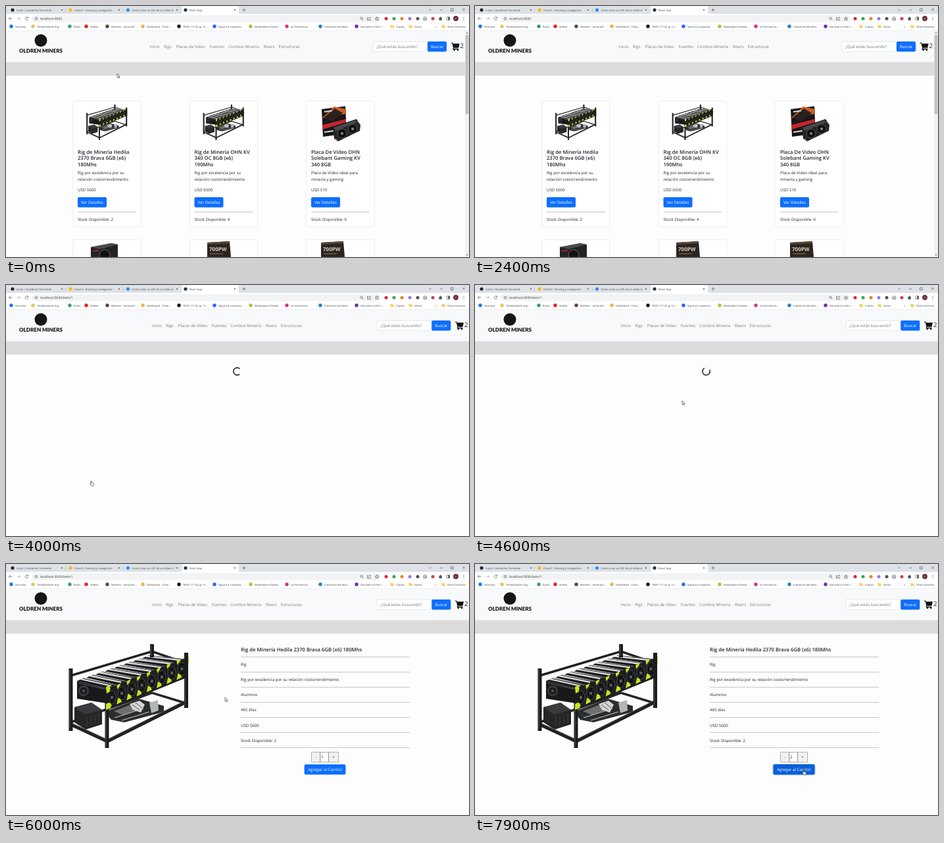
These frames come from a looping animation (704 by 382 pixels, 8 s). An HTML page:

```html
<!DOCTYPE html>
<html lang="es">
<head>
<meta charset="utf-8">
<title>React App</title>
<style>
  html, body { margin: 0; width: 100%; height: 100%; overflow: hidden; background: #fdfdfd; }
  svg { display: block; width: 100vw; height: 100vh; }
  text {
    font: 6.12px "Open Sans", "Noto Sans", sans-serif; fill: #212529;
    white-space: pre; text-rendering: geometricPrecision;
  }
  .tab { font-size: 4.1px; fill: #45494d; }
  .url { font-size: 4.9px; fill: #303336; }
  .mark { font-size: 3.95px; fill: #3c4043; }
  .nav { fill: #7a7b7c; }
  .hint { fill: #6c757d; }
  .title { font-size: 7.66px; font-weight: 600; }
  .brand { font: 900 8.1px Lato, "Open Sans", sans-serif; fill: #161616; }
  .count { font-size: 9.6px; }
  .light { fill: #fff; }
  .mid { text-anchor: middle; }
  .line { fill: none; stroke: #50545a; stroke-width: .7; }

  .step { animation: 8s step-end infinite; }
  .home { animation-name: home; }
  .loading { animation-name: loading; }
  .detail { animation-name: detail; }
  .item { animation-name: item; }
  .navShift { animation-name: navShift; }
  .endShift { animation-name: endShift; }
  .seeMore { animation-name: seeMore; }
  .plus { animation-name: plus; }
  .add { animation-name: add; }
  .ring { animation-name: ring; }
  .one { animation-name: one; }
  .two { animation-name: two; }
  .arrow { animation-name: arrow; }
  .hand { animation-name: hand; }
  .spin { transform-origin: 351.5px 131.5px; animation: spin 8s linear infinite; }
  .cursor { animation: travel 8s ease-in-out infinite; }

  @keyframes home { 0% { visibility: visible } 50%, 100% { visibility: hidden } }
  @keyframes loading { 0% { visibility: hidden } 50% { visibility: visible } 72.5%, 100% { visibility: hidden } }
  @keyframes detail { 0% { visibility: hidden } 72.5%, 100% { visibility: visible } }
  @keyframes item { 0% { visibility: hidden } 50%, 100% { visibility: visible } }
  @keyframes navShift { 0% { transform: none } 50%, 100% { transform: translateX(3.2px) } }
  @keyframes endShift { 0% { transform: none } 50%, 100% { transform: translateX(6.3px) } }
  @keyframes seeMore { 0% { fill: #0d6efd } 47.5% { fill: #0b5ed7 } 50%, 100% { fill: #0d6efd } }
  @keyframes plus { 0% { fill: #f2f2f2 } 87.5% { fill: #e4e4e4 } 93.75%, 100% { fill: #f2f2f2 } }
  @keyframes add { 0% { fill: #0d6efd } 82.5% { fill: #0b5ed7 } 86.25% { fill: #0d6efd } 93.75%, 100% { fill: #0b5ed7 } }
  @keyframes ring { 0% { opacity: 0 } 98.75%, 100% { opacity: 1 } }
  @keyframes one { 0% { opacity: 1 } 88.75%, 100% { opacity: 0 } }
  @keyframes two { 0% { opacity: 0 } 88.75%, 100% { opacity: 1 } }
  @keyframes arrow {
    0% { opacity: 1 } 11.25% { opacity: 0 } 36.25% { opacity: 1 } 41.25% { opacity: 0 }
    51.25% { opacity: 1 } 82.5%, 100% { opacity: 0 }
  }
  @keyframes hand {
    0% { opacity: 0 } 11.25% { opacity: 1 } 25% { opacity: 0 } 41.25% { opacity: 1 }
    51.25% { opacity: 0 } 82.5%, 100% { opacity: 1 }
  }
  @keyframes spin { 0%, 50% { transform: rotate(0) } 72.5%, 100% { transform: rotate(864deg) } }
  @keyframes travel {
    0% { transform: translate(169px, 103px) }
    11.25% { transform: translate(148px, 298px) }
    15% { transform: translate(151px, 311px) }
    18.75%, 36.25% { transform: translate(153.5px, 306.5px) }
    43.75%, 50% { transform: translate(129.5px, 298px) }
    57.5%, 60% { transform: translate(315px, 176px) }
    70%, 77.5% { transform: translate(333px, 203px) }
    83.75% { transform: translate(494px, 309px) }
    87.5%, 91.25% { transform: translate(497.5px, 295px) }
    95%, 100% { transform: translate(499.5px, 313px) }
  }
</style>
</head>
<body>
<script>
const text = (x, y, s, cls = '') => `<text x="${x}" y="${y}" class="${cls}">${s}</text>`;
const rect = (x, y, w, h, fill, r = 0, more = '') =>
  `<rect x="${x}" y="${y}" width="${w}" height="${h}" rx="${r}" fill="${fill}" ${more}/>`;
const dot = (x, y, r, fill, more = '') => `<circle cx="${x}" cy="${y}" r="${r}" fill="${fill}" ${more}/>`;
const poly = (points, fill, more = '') => `<polygon points="${points}" fill="${fill}" ${more}/>`;
const path = (d, more = 'class="line"') => `<path d="${d}" ${more}/>`;
const bar = (d, width, color) => path(d, `fill="none" stroke="${color}" stroke-width="${width}"`);
const rule = (x, y, w) => rect(x, Math.round(y), w, 1, '#c6c7c8');
const group = (cls, ...parts) => `<g class="${cls}">${parts.join('')}</g>`;
const repeat = (n, fn) => Array.from({ length: n }, (_, i) => fn(i)).join('');
const cross = (x, y, r) => path(`M${x - r} ${y - r}l${2 * r} ${2 * r}m0 ${-2 * r}l${-2 * r} ${2 * r}`);
const BLUE = '#0d6efd';
const LIME = '#cbe41c';

function browser() {
  const tabs = [
    [10, '#24272b', 'Inicio | Academia Torivende'],
    [98, '#f5ba15', 'Clase 8 - Routing y navegación'],
    [185.5, '#2d8cf0', 'Como crear un GIF de un vídeo d'],
    [273, '#20353b', 'React App'],
  ];
  const marks = [
    [8, '#1877f2', 'Vecinova'], [41, '#e5c65a', 'TiendaSolares Arg...'], [97, '#34a066', 'Rutas'],
    [122, '#e8211d', 'Videlia'], [154, '#5b4632', 'Workers - tamuro41...'],
    [208, '#e3b64c', 'Dashboard - Olvar...'], [263, '#111', 'TRVN 117.32 ▲ +3...'],
    [317, '#2962ff', 'Sigue tus criptomo...'], [372, '#a2c83a', 'Marketplace Dashb...'],
    [427, '#d63384', 'xx Ferrutecno...'], [478, '#2580c3', 'Cotización del dóla...'],
    [533, '#6f2da8', 'Gonzalo Le Virel /...'],
  ];
  const folders = [[587, 'Criptos'], [615, 'Varios'], [665, 'Otros favoritos']];
  const extensions = [
    [578, '#d8273b'], [590, '#35a853'], [602, '#e5822d'], [614, '#9a78d8'],
    [626, '#555'], [649, '#c8444b'],
  ];
  return [
    rect(0, 0, 704, 12.5, '#dee1e6'),
    rect(267.5, 0, 86.5, 13, '#fff', 2),
    rect(0, 12, 704, 26, '#fff'),
    ...tabs.map(([x, c, s], i) =>
      dot(x, 6, 2.6, c) + text(x + 6, 7.7, s, 'tab') + cross([85, 172, 260, 348][i], 6, 1.2)),
    path('M90.5 4v5M178.5 4v5', 'stroke="#a0a4a9" stroke-width=".5"'),
    path('M359.5 6h5m-2.5-2.5v5M643.3 5l1.7 1.7 1.7-1.7M660 6h4M676.5 4h3.6v3.6h-3.6z'),
    cross(696, 5.5, 1.7),
    path('M9.5 19h-5m2-2l-2 2 2 2'),
    path('M16.5 19h5m-2-2l2 2-2 2', 'class="line" opacity=".55"'),
    path('M33.4 17.8a2.3 2.3 0 1 0 .3 2M33.8 16.3v1.8h-1.8'),
    rect(39, 14, 531, 10.4, '#f1f3f4', 5.2),
    dot(46, 19.2, 2, 'none', 'stroke="#50545a" stroke-width=".6"'),
    path('M46 18.8v1.4M46 17.9v.4'),
    text(52, 21, 'localhost:3000<tspan class="step item">/item/1</tspan>', 'url'),
    dot(540.5, 18.7, 1.7, 'none', 'stroke="#50545a" stroke-width=".7"'),
    path('M541.7 20l1.6 1.6M551 17.5h-1.5v4h5v-1.6M551 20q.5-2.5 3.5-2.5l-1-1m1 1l-1 1'),
    path('M564 16.5l.8 1.8 2 .2-1.5 1.3.5 2-1.8-1.1-1.8 1.1.5-2-1.5-1.3 2-.2z'),
    ...extensions.map(([x, c]) => dot(x, 19.2, 2.5, c)),
    path('M634.8 17.8h1l.6-1h1.6l.6 1h1v3.6h-4.8zM637.2 18.8a.8.8 0 1 0 .1 0'),
    path('M658.4 17.8h1.6a.9.9 0 1 1 1.5 0h1.3v4h-4.4z', 'fill="#50545a"'),
    rect(670, 16.8, 4.6, 4.6, 'none', .5, 'stroke="#444" stroke-width=".6"'),
    rect(672.4, 16.8, 2.2, 4.6, '#444'),
    dot(684, 19, 3.9, '#6d2b35'),
    text(684, 20.6, 'Y', 'tab mid light'),
    repeat(3, i => dot(696, 17.4 + i * 1.8, .55, '#50545a')),
    ...marks.map(([x, c, s]) => dot(x, 31, 2.7, c) + text(x + 6, 32.5, s, 'mark')),
    ...folders.map(([x, s]) =>
      path(`M${x - 2.5} 28.8h2l.7.8h2.5v3.8h-5.2z`, 'fill="#f6cf65"') + text(x + 6, 32.5, s, 'mark')),
    text(652, 32.6, '»', 'tab'),
    rect(0, 37.5, 704, .5, '#dadce0'),
  ].join('');
}

function header() {
  const links = [[218.5, 'Inicio'], [240, 'Rigs'], [258.5, 'Placas de Video'], [309.5, 'Fuentes'],
    [338, 'Combos Minería'], [391.7, 'Risers'], [414.5, 'Estructuras']];
  return [
    rect(0, 38, 704, 47.5, '#f8f9fa'),
    rect(0, 85.5, 704, 20.5, '#dcdcdc'),
    dot(53, 52.5, 9.5, '#161616'),
    text(53, 71, 'OLDREN MINERS', 'brand mid'),
    group('step navShift', ...links.map(([x, s]) => text(x, 64.2, s, 'nav'))),
    group('step endShift',
      rect(557.7, 54.2, 83, 15.4, '#fff', 2, 'stroke="#ced4da" stroke-width=".6"'),
      text(563, 64.2, '¿Qué estás buscando?', 'hint'),
      rect(641, 54, 29, 15.6, BLUE, 2),
      text(655.6, 64.2, 'Buscar', 'mid light'),
      path('M676.5 56.3h2.2l2 7.4h7.6M680.4 64l-.4 1.6h8', 'fill="none" stroke="#111" stroke-width="1.1"'),
      poly('679,57.3 689.7,57.3 688.3,62.9 680.5,62.9', '#111'),
      dot(681.6, 67, 1.2, '#111'), dot(687, 67, 1.2, '#111'),
      text(690.6, 64.3, '2', 'count')),
  ].join('');
}

function rig() {
  const card = i => {
    const x = 15.2 * i, y = -5.6 * i;
    return poly(`${108 + x * .93},${178 + y * .88} ${117 + x * .93},${174 + y * .88} ${167 + x},${184 + y} ${155 + x},${190 + y}`, '#1a1b1c')
      + bar(`M${113 + x * .93} ${175 + y * .88}L${160 + x} ${185.5 + y}`, 2.2, '#e3e4e4')
      + bar(`M${118 + x * .93} ${173.5 + y * .88}L${164 + x} ${184 + y}`, .8, '#77797a');
  };
  const fan = i => {
    const x = 161 + 15.2 * i, y = 203 - 6.2 * i;
    return `<ellipse cx="${x}" cy="${y}" rx="6" ry="10" fill="#111213" stroke="#484b4c"/>`
      + bar(`M${x - 4} ${y - 5}l8 10M${x + 4} ${y - 7}l-8 14`, .8, '#3b3e3f')
      + dot(x, y, 2.2, '#5c5f61')
      + poly(`${x - 8},${y - 12} ${x - 2},${y - 15} ${x - 3},${y - 11} ${x - 7},${y - 6}`, LIME)
      + poly(`${x - 8},${y + 17} ${x},${y + 13} ${x - 2},${y + 9} ${x - 6},${y + 7}`, LIME);
  };
  return [
    bar('M98 241L222 196L274 212', 3.5, '#242526'),
    poly('104,218 130,211 146,222 146,244 121,252 104,241', '#242526'),
    poly('104,218 130,211 146,222 120,229', '#3a3b3c'),
    repeat(4, i => bar(`M${123 + i * 6} ${232 - i * 1.7}v15`, .7, '#4a4c4d')),
    poly('150,225 202,205 240,216 240,225 180,241 160,237', '#2a2c2d'),
    poly('164,224 190,214 204,220 178,230', '#6d7071'),
    poly('188,213 203,208 211,214 205,226 193,222', '#d4d6d6'),
    bar('M192 214l11 8M197 211l10 8', 1, '#4d5051'),
    poly('218,211 231,207 232,223 221,227', '#b4b7b8'),
    bar('M165 234l44-14M176 238l42-13', 1.2, '#c0c2c3'),
    bar('M98 170L222 133L274 151', 3.5, '#202122'),
    poly('108,178 154,190 154,212 108,205', '#18191a'),
    bar('M110 181L152 191', 1, '#55585a'),
    dot(118, 193, 8, '#3a3c3d'), dot(118, 193, 5.5, '#191a1b'), dot(118, 193, 2, '#555'),
    repeat(8, card),
    poly('152,190 277,142 277,172 154,222', '#1d1f20'),
    repeat(8, fan),
    poly('272,143 278,140 278,152 275,148', LIME),
    poly('271,173 277,170 277,162 273,165', LIME),
    bar('M98 244L154 270L274 210', 5, '#202122'),
    bar('M100 242L154 267L272 208', .8, '#515455'),
    bar('M98.5 159V254M153.5 190V280M274 135V219M222 122V142', 6, '#1b1c1d'),
    bar('M97 161V251M152 222V278M272.5 174V216M220.5 124V140', 1, '#505253'),
    poly('152,187 158,184 158,194 153,197', LIME),
    poly('152,222 160,219 156,211 152,213', LIME),
  ].join('');
}

const smallRig = '<g transform="translate(89.5 108.3) scale(.342)">' + rig() + '</g>';

const boxedCard = [
  poly('480,157 516,152.5 518,194 482,199', '#191717'),
  poly('480,171 499,153 517,157 517,164', '#c85d24'),
  poly('483,170 500,156 512,163 496,176', '#2a211e'),
  poly('481,181 517,172 517,177 481,188', '#c3272f'),
  bar('M484 161l12-1.6M484 192l14-2', 1.8, '#ddd'),
  poly('497,184 533,172 539,181 538,190 505,206 499,202', '#232426'),
  poly('499,185 531,174 534,177 501,190', '#47494c'),
  repeat(2, i => dot(511 + i * 16, 194 - i * 7, 7, '#111', 'stroke="#55585a" stroke-width="1"')
    + dot(511 + i * 16, 194 - i * 7, 2, '#8b8d90')),
  bar('M500 202l4 2M534 175l4 5', 1.2, '#d4552d'),
].join('');

const powerBox = (x, label) => poly(`${x},360 ${x + 34},358 ${x + 36},382 ${x},382`, '#2b2421')
  + poly(`${x},360 ${x + 34},358 ${x + 34},361 ${x},363`, '#5a4638')
  + `<text x="${x + 3}" y="372.5" style="font-weight:700;font-size:8px;fill:#d9cfbd">${label}</text>`
  + bar(`M${x + 4} 377h20`, 1.2, '#8a6a45');

function home() {
  const cards = [
    { title: ['Rig de Minería Hedila', '2370 Brava 6GB (x6)', '180Mhs'], price: 5600, stock: 2 },
    { title: ['Rig de Minería OHN KV', '340 OC 8GB (x6)', '190Mhs'], price: 6500, stock: 4 },
    { title: ['Placa De Video OHN', 'Solebant Gaming KV', '340 8GB'], price: 510, stock: 6,
      about: ['Placa de Video ideal para', 'minería y gaming'] },
  ];
  const rigAbout = ['Rig por excelencia por su', 'relación costo/rendimiento'];
  const frame = 'stroke="#e2e2e3" stroke-width=".6"';
  return group('step home',
    ...cards.map(({ title, price, stock, about = rigAbout }, i) => `<g transform="translate(${177.5 * i} 0)">` + [
      rect(102, 144.5, 103, 191.5, '#fff', 1.5, frame),
      rect(102, 355.8, 103, 60, '#fff', 1.5, frame),
      i < 2 ? smallRig : '',
      ...title.map((s, n) => text(109, 224.5 + 9.65 * n, s, 'title')),
      ...about.map((s, n) => text(109, 256.4 + 9.6 * n, s)),
      text(109, 282, 'USD ' + price),
      rect(109, 291, 44, 15.5, BLUE, 2, i ? '' : 'class="step seeMore"'),
      text(131, 301.2, 'Ver Detalles', 'mid light'),
      rule(109, 313, 89),
      text(109, 326.6, 'Stock Disponible: ' + stock),
    ].join('') + '</g>'),
    boxedCard,
    poly('129,367 160,361 170,363 170,382 129,382', '#222325'),
    poly('129,367 160,361 170,363 142,370', '#494b4e'),
    bar('M132 373l9-1', 1.5, '#c12c30'),
    dot(150, 379, 8, '#111', 'stroke="#666" stroke-width="1"'),
    powerBox(306, '700PW'), powerBox(479, '700PW'),
    rect(698, 38, 6, 344, '#f1f1f1'),
    rect(698.6, 44, 4.8, 120.5, '#c1c1c1'),
    poly('699.5,42 701,40 702.5,42', '#666'), poly('699.5,378 701,380 702.5,378', '#666'));
}

function detail() {
  const rows = ['Rig', 'Rig por excelencia por su relación costo/rendimiento', 'Aluminio', '465 días',
    'USD 5600', 'Stock Disponible: 2'];
  const edge = 'stroke="#767676" stroke-width=".6"';
  return group('step detail',
    rig(),
    text(357, 133.2, 'Rig de Minería Hedila 2370 Brava 6GB (x6) 180Mhs', 'title'),
    ...rows.map((s, i) => text(357, 155.3 + 23.05 * i, s)),
    repeat(7, i => rule(357, 141 + 23.05 * i, 257)),
    rect(464.4, 286.3, 13.2, 15.4, '#f2f2f2', 1.2, edge),
    rect(477.9, 286.3, 12.4, 15.4, '#fff', 0, edge),
    rect(490.7, 286.3, 14.8, 15.4, '#f2f2f2', 1.2, edge + ' class="step plus"'),
    text(471, 296.3, '-', 'mid'), text(498, 296.3, '+', 'mid'),
    text(479.3, 296.3, '1', 'step one'), text(479.3, 296.3, '2', 'step two'),
    rect(452.4, 304, 65.2, 17.6, '#9ec5fe', 3, 'class="step ring"'),
    rect(453.6, 305.1, 62.8, 15.4, BLUE, 2, 'class="step add"'),
    text(485, 315.2, 'Agregar al Carrito!', 'mid light'));
}

const spinner = group('step loading',
  path('M355.5 135.5A5.66 5.66 0 1 1 355.5 127.5', 'class="spin" fill="none" stroke="#212529" stroke-width="1.6"'));

const outline = 'fill="#fff" stroke="#111" stroke-width="1.5" transform=';
const cursor = group('cursor',
  group('step arrow', path('M0 0v17l4-4 3 6 2.5-1-3-6h5.5z', outline + '"scale(.36)"')),
  group('step hand', path('M5 2q1.5-2 3 0v7l7 1.5q2 .5 2 2.5v4l-2 5h-8l-5-7q-1-2 1-2l2 2z',
    outline + '"translate(-2.4 -.3) scale(.37)"')));

document.body.innerHTML = '<svg viewBox="0 0 704 382" preserveAspectRatio="none">'
  + rect(0, 0, 704, 382, '#fdfdfd') + browser() + header() + home() + spinner + detail() + cursor + '</svg>';
</script>
</body>
</html>
```
